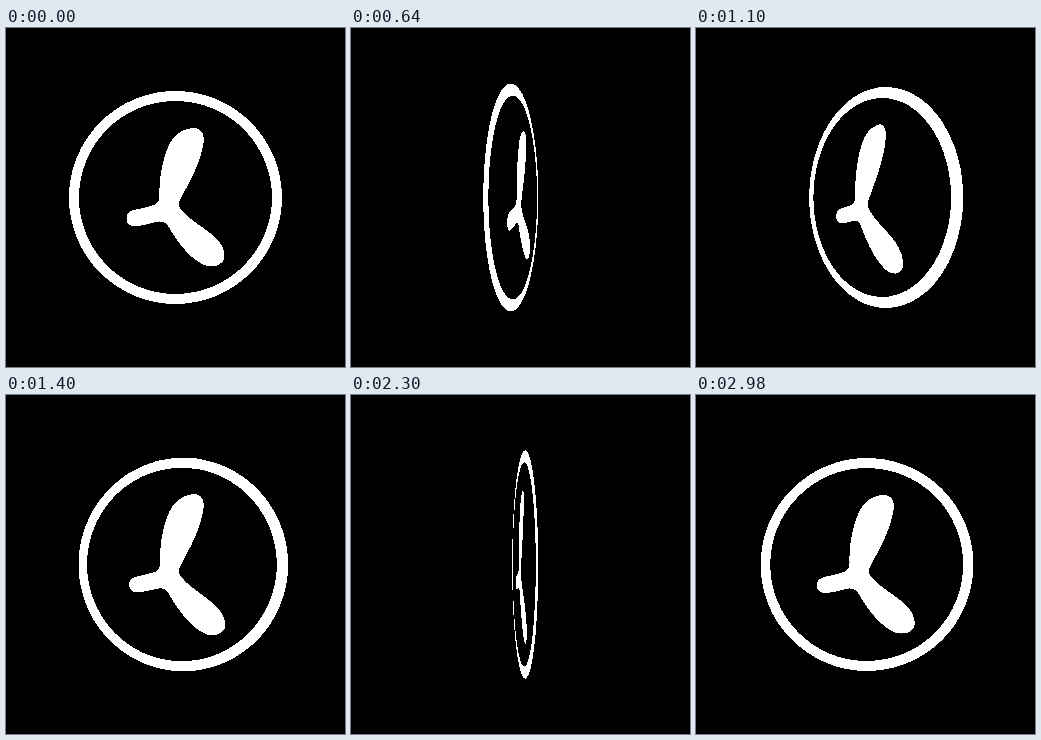
An HTML page without scripts that plays this animation: 339 px wide and 339 px high, repeating every 3 s.

```html
<!DOCTYPE html>
<html lang="en">
<head>
<meta charset="utf-8">
<title>Spinning disc</title>
<style>
  html, body {
    margin: 0;
    width: 100%;
    height: 100%;
    overflow: hidden;
    background: #000;
  }
  /* High contrast keeps the edges hard, without grey pixels */
  .stage {
    width: 339px;
    height: 339px;
    overflow: hidden;
    background: #000;
    perspective: 294px;
    filter: contrast(40);
  }
  /* Half a turn, then the disc snaps round so its face never reads mirrored */
  .disc {
    display: block;
    width: 339px;
    height: 339px;
    animation: spin 1.5s linear -0.75s infinite;
  }
  @keyframes spin {
    from { transform: rotateY(-90deg); }
    to { transform: rotateY(90deg); }
  }
</style>
</head>
<body>
<div class="stage">
  <svg class="disc" viewBox="0 0 339 339">
    <circle cx="169.5" cy="169.5" r="101.5" fill="none" stroke="#fff" stroke-width="10"/>
    <path fill="#fff" d="M187 100
      C195 99.5 199 106 197.5 115
      C195 134 184 153 174.5 171
      Q171.5 176 174 180
      C181 191 200 200 211 211
      C218 219 220 227 217.5 232.5
      C213 239 204 240 196 236
      C181 228 170 211 162 198
      Q159 193 153 193.5
      C145 195 137 198 129 198
      C123 198 120.5 195 120.5 190.5
      C120.5 186 123 183.5 128 182
      C136 180 142 179 148 177
      Q153.5 174.5 153.5 168
      C153 152 156 132 163 117
      C169 105 178 100.5 187 100Z"/>
  </svg>
</div>
</body>
</html>
```
